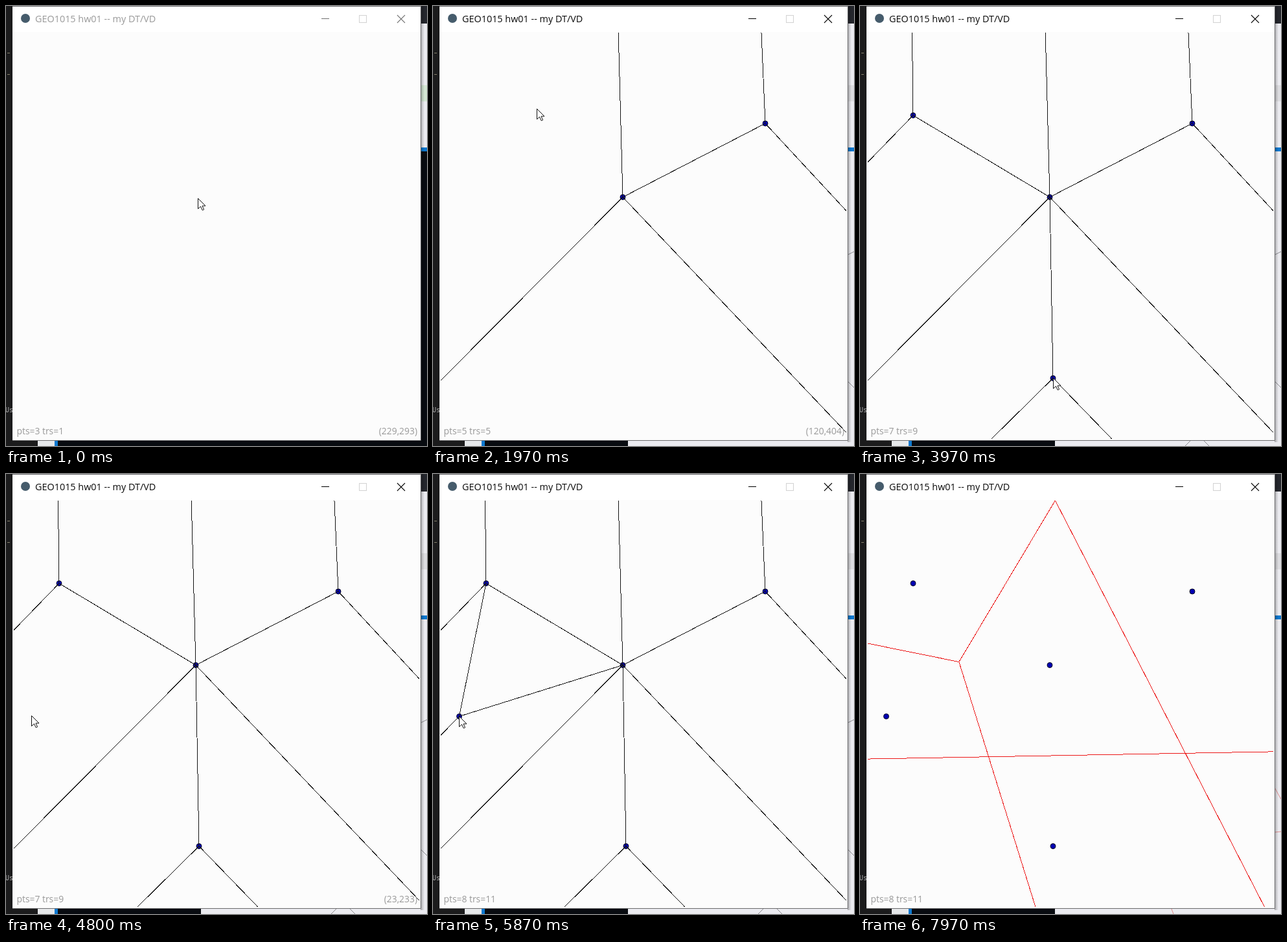
An HTML page for the animation above (8 s loop, 650x678 px).

```html
<!DOCTYPE html>
<html lang="en">
<head>
<meta charset="utf-8">
<title>Delaunay and Voronoi viewer</title>
<style>
html, body { margin: 0; width: 100%; height: 100%; overflow: hidden; background: #1b1b1c; }
svg { display: block; width: 650px; height: 678px; }
text { font-family: "Open Sans", "Noto Sans", sans-serif; }
line { shape-rendering: crispEdges; }
.title { font-size: 14.4px; }
.status { font-size: 13.9px; fill: #999; }
.dt { stroke: #141414; }
.vd { stroke: #ec1818; }
.site { fill: #0000b4; stroke: #08081c; }
.far { fill: none; stroke: #8c8c90; }
.far.red { stroke: #e08c8c; }
.btn { fill: none; stroke-width: 1.1; }
</style>
</head>
<body>
<svg viewBox="0 0 650 678" xmlns="http://www.w3.org/2000/svg">
  <defs>
    <clipPath id="view"><rect x="12" y="41" width="626" height="626"/></clipPath>
    <linearGradient id="shade"><stop stop-opacity=".3"/><stop offset="1" stop-opacity="0"/></linearGradient>
  </defs>

  <!-- desktop behind the window -->
  <rect width="650" height="678" fill="#1b1b1c"/>
  <path d="M2 72.5h4M2 105.5h4" stroke="#85806c"/>
  <text x="-1" y="626" font-size="10" style="font-family:'Noto Sans Mono',monospace" fill="#b4b4b4">Us</text>
  <rect x="640" width="10" height="27" fill="#24262c"/>
  <rect x="640" y="27" width="10" height="191" fill="#ebebf0"/>
  <rect id="band" x="640" y="122" width="10" height="25"/>
  <rect x="640" y="218" width="10" height="6" fill="#0a78d0"/>
  <path d="M640 224h10v454H80v-9h560z" fill="#080b10"/>
  <rect x="49" y="669" width="26" height="9" fill="#e6e8ea"/>
  <rect x="75" y="669" width="5" height="9" fill="#0a78d0"/>
  <path data-from="100" d="M640 224h10v454H301v-9h339z" fill="#ebebf0"/>
  <path class="far" data-from="1330" data-to="7400" d="M640 383.5l10-5M640 578l10 10"/>
  <path class="far" data-from="3900" data-to="7400" d="M502 678l9-9M530 669l9 9"/>
  <path class="far red" data-from="7400" d="M640 483l10 18M640 552l10-1M480.5 669l3.5 9"/>
  <rect x="640" width="6" height="672" fill="url(#shade)"/>

  <!-- window -->
  <rect x="10" width="630" height="669" fill="#fcfcfc"/>
  <rect x="10" width="630" height="40" fill="#fff"/>
  <path d="M10 .5h630M640.5 0v669.5H10" fill="none" stroke="#6a6a6c"/>
  <circle cx="30" cy="19" r="7" fill="#465c6c"/>
  <text id="title" class="title" x="45" y="25">GEO1015 hw01 -- my DT/VD</text>
  <path id="min" class="btn" d="M487 19.5h12"/>
  <rect class="btn" x="545.5" y="14.5" width="11" height="11" stroke="#d4d4d4"/>
  <path id="close" class="btn" d="M604 14l12 12M616 14l-12 12"/>

  <g id="scene" clip-path="url(#view)"><g id="sites"></g><g id="edges"></g></g>
  <text id="count" class="status" x="16.5" y="660"></text>
  <text id="pos" class="status" x="635" y="660" text-anchor="end"></text>
  <path id="cursor" d="M.5 .5v16l4-3.6 2.7 5.8 2.4-1-2.6-5.7h5z" fill="#fff" stroke="#101010"/>
</svg>
<script>
const LOOP = 8000, VORONOI = 7400, EXIT = 6450;
const $ = id => document.getElementById(id);

function add(parent, tag, attrs) {
  const el = document.createElementNS("http://www.w3.org/2000/svg", tag);
  for (const k in attrs) el.setAttribute(k, attrs[k]);
  $(parent).append(el);
}
function line(cls, from, to, a, b) {
  add("edges", "line", {
    class: cls, x1: a.x, y1: a.y, x2: b.x, y2: b.y, "data-from": from, "data-to": to
  });
}

// where the pointer rests; a click there inserts a point
const stop = (arrive, leave, x, y, click) => ({ arrive, leave, x, y, click });
const stops = [
  stop(0, 100, 296, 296),
  stop(130, 400, 293, 294.5, 300),
  stop(1050, 1800, 513, 181, 1130),
  stop(1970, 2000, 160, 158),
  stop(2500, 2860, 82, 168.5, 2770),
  stop(3230, 3270, 279, 543),
  stop(3550, 4000, 298, 573.5, 3700),
  stop(4700, 5100, 39, 372),
  stop(5200, 5930, 40.5, 373.5, 5400),
  stop(EXIT, LOOP, 61, 666.5)
];
const clicks = stops.filter(s => s.click);

// each point splits the triangle that holds it, inside one huge triangle
const cross = (a, b, p) => (b.x - a.x) * (p.y - a.y) - (b.y - a.y) * (p.x - a.x);
const holds = ([a, b, c], p) => cross(a, b, p) > 0 && cross(b, c, p) > 0 && cross(c, a, p) > 0;
const tris = [[{ x: -80, y: -13600 }, { x: 14300, y: 15011 }, { x: -13700, y: 14360 }]];

for (const p of clicks) {
  const i = tris.findIndex(t => holds(t, p));
  const [a, b, c] = tris[i];
  tris.splice(i, 1, [a, b, p], [b, c, p], [c, a, p]);
  for (const v of [a, b, c]) line("dt", p.click, VORONOI, p, v);
  add("sites", "circle", { class: "site", cx: p.x, cy: p.y, r: 4, "data-from": p.click });
}

// the dual joins the circumcentres of triangles that share an edge
function centre([a, b, c]) {
  const bx = b.x - a.x, by = b.y - a.y, cx = c.x - a.x, cy = c.y - a.y;
  const d = 2 * (bx * cy - by * cx), bb = bx * bx + by * by, cc = cx * cx + cy * cy;
  return { x: a.x + (cy * bb - by * cc) / d, y: a.y + (bx * cc - cx * bb) / d };
}
tris.forEach((s, i) => {
  for (const t of tris.slice(i + 1))
    if (s.filter(v => t.includes(v)).length === 2) line("vd", VORONOI, LOOP, centre(s), centre(t));
});

function pointer(t) {
  const i = stops.findLastIndex(s => s.arrive <= t), a = stops[i], b = stops[i + 1];
  if (t < a.leave || !b) return a;
  const u = (t - a.leave) / (b.arrive - a.leave), e = u * u * (3 - 2 * u);
  return { x: a.x + (b.x - a.x) * e, y: a.y + (b.y - a.y) * e };
}

const timed = [...document.querySelectorAll("[data-from]")].map(el => ({
  el, from: +el.dataset.from, to: +(el.dataset.to || LOOP)
}));
const show = (el, on) => { el.style.display = on ? "" : "none"; };

function draw(t) {
  for (const { el, from, to } of timed) show(el, t >= from && t < to);

  $("title").style.fill = t < 300 ? "#999" : "#0a0a0a";
  $("min").style.stroke = $("close").style.stroke = t < 100 ? "#777" : "#0a0a0a";
  $("band").style.fill = t < 100 ? "#d4e6d4" : "#dcdce0";

  const { x, y } = pointer(t);
  $("cursor").setAttribute("transform", `translate(${Math.floor(x)} ${Math.floor(y)})`);
  show($("cursor"), t < EXIT);

  const n = clicks.filter(c => t >= c.click).length;
  $("count").textContent = `pts=${3 + n} trs=${1 + 2 * n}`;
  const blank = t >= VORONOI || clicks.some(c => t >= c.click && t < c.leave);
  $("pos").textContent = blank ? "" :
    `(${Math.round((x - 10) / 1.25)},${Math.round((662.7 - y) / 1.25)})`;
}

const start = performance.now();
function tick() {
  draw((performance.now() - start) % LOOP);
  requestAnimationFrame(tick);
}
tick();
</script>
</body>
</html>
```
